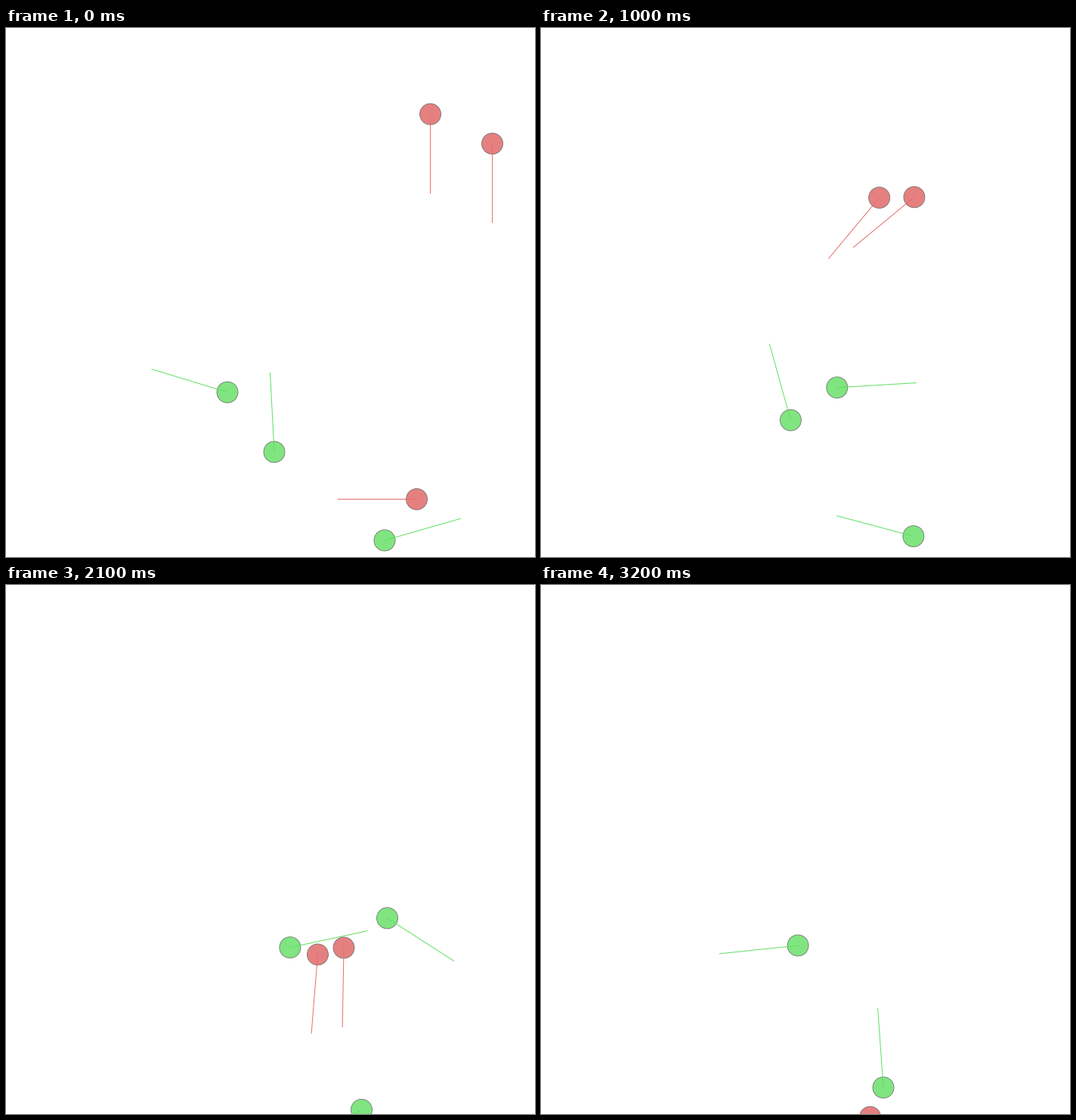
Animation, 700 px wide and 700 px high, one loop 3300 ms. Source, as a matplotlib script:

```python
import math

import matplotlib.pyplot as plt
from matplotlib.animation import FuncAnimation

SIZE, DPI, FRAMES, STEP = 700, 100, 33, 100
RADIUS, REACH = 14, 105
MIN_PULL = 20
PX = 72 / DPI
GREEN = ("#80e580", "#60e060")
RED = ("#e58080", "#e86e6e")

# Key poses: time step, x, y, heading in degrees (clockwise from right).
# Agents drive along their heading and vanish after the last pose.
AGENTS = [
    (GREEN, [(0, 355, 561, 267), (7, 335, 535, 217), (13, 336, 500, 292),
             (18, 365, 476, 353), (25, 390, 484, 340), (32, 340, 477, 534)]),
    (GREEN, [(0, 501, 678, -16), (5, 502, 681, 258), (7, 498, 678, 188),
             (13, 488, 666, 202), (18, 475, 687, 90), (25, 461, 694, 242),
             (32, 453, 665, 266)]),
    (GREEN, [(0, 293, 482, 197), (5, 318, 479, -2), (13, 436, 473, -4),
             (18, 475, 469.5, -32.5), (24, 520, 434, 98)]),
    (RED, [(0, 561.5, 114, 90), (7, 485.5, 180, 154.5), (13, 429, 285, 105),
           (18, 416, 410, 93), (25, 404.5, 594, 97), (32, 435.5, 704, 70)]),
    (RED, [(0, 643.5, 153, 90), (7, 542, 193, 174), (13, 466, 279, 107),
           (21, 447, 480, 91)]),
    (RED, [(0, 543.5, 623.5, 180), (6, 434, 623.5, 180)]),
]


def drive(start, end, t):
    """Position and heading between two poses, leaving and arriving head-on."""
    t0, x0, y0, a0 = start
    t1, x1, y1, a1 = end
    u = (t - t0) / (t1 - t0)
    ease = u * u * (3 - 2 * u)
    pull = max(math.hypot(x1 - x0, y1 - y0), MIN_PULL)
    leave, arrive = pull * u * (1 - u) ** 2, pull * u * u * (1 - u)
    r0, r1 = math.radians(a0), math.radians(a1)
    x = x0 + (x1 - x0) * ease + leave * math.cos(r0) - arrive * math.cos(r1)
    y = y0 + (y1 - y0) * ease + leave * math.sin(r0) - arrive * math.sin(r1)
    return x, y, r0 + (r1 - r0) * ease


class Agent:
    def __init__(self, ax, colors, poses, z):
        self.poses = poses
        fill, stroke = colors
        self.body = ax.add_patch(plt.Circle(
            (0, 0), RADIUS, fc=fill, ec="#707070", lw=0.8 * PX, zorder=z))
        self.ray, = ax.plot([], [], color=stroke, lw=PX, zorder=z + 0.5,
                            solid_capstyle="butt", snap=False)

    def update(self, t):
        legs = zip(self.poses, self.poses[1:])
        leg = next((pair for pair in legs if t <= pair[1][0]), None)
        self.body.set_visible(leg is not None)
        self.ray.set_visible(leg is not None)
        if leg:
            x, y, a = drive(*leg, t)
            self.body.center = x, y
            self.ray.set_data([x, x + REACH * math.cos(a)],
                              [y, y + REACH * math.sin(a)])
        return self.body, self.ray


fig = plt.figure(figsize=(SIZE / DPI, SIZE / DPI), dpi=DPI, facecolor="white")
ax = fig.add_axes([0, 0, 1, 1])
ax.axis("off")
ax.set(xlim=(0, SIZE), ylim=(SIZE, 0))
agents = [Agent(ax, colors, poses, z)
          for z, (colors, poses) in enumerate(AGENTS, 1)]


def draw(frame):
    return [artist for agent in agents for artist in agent.update(frame)]


anim = FuncAnimation(fig, draw, frames=FRAMES, interval=STEP, repeat=True,
                     repeat_delay=0, init_func=lambda: draw(0), blit=False)
plt.show()
```
